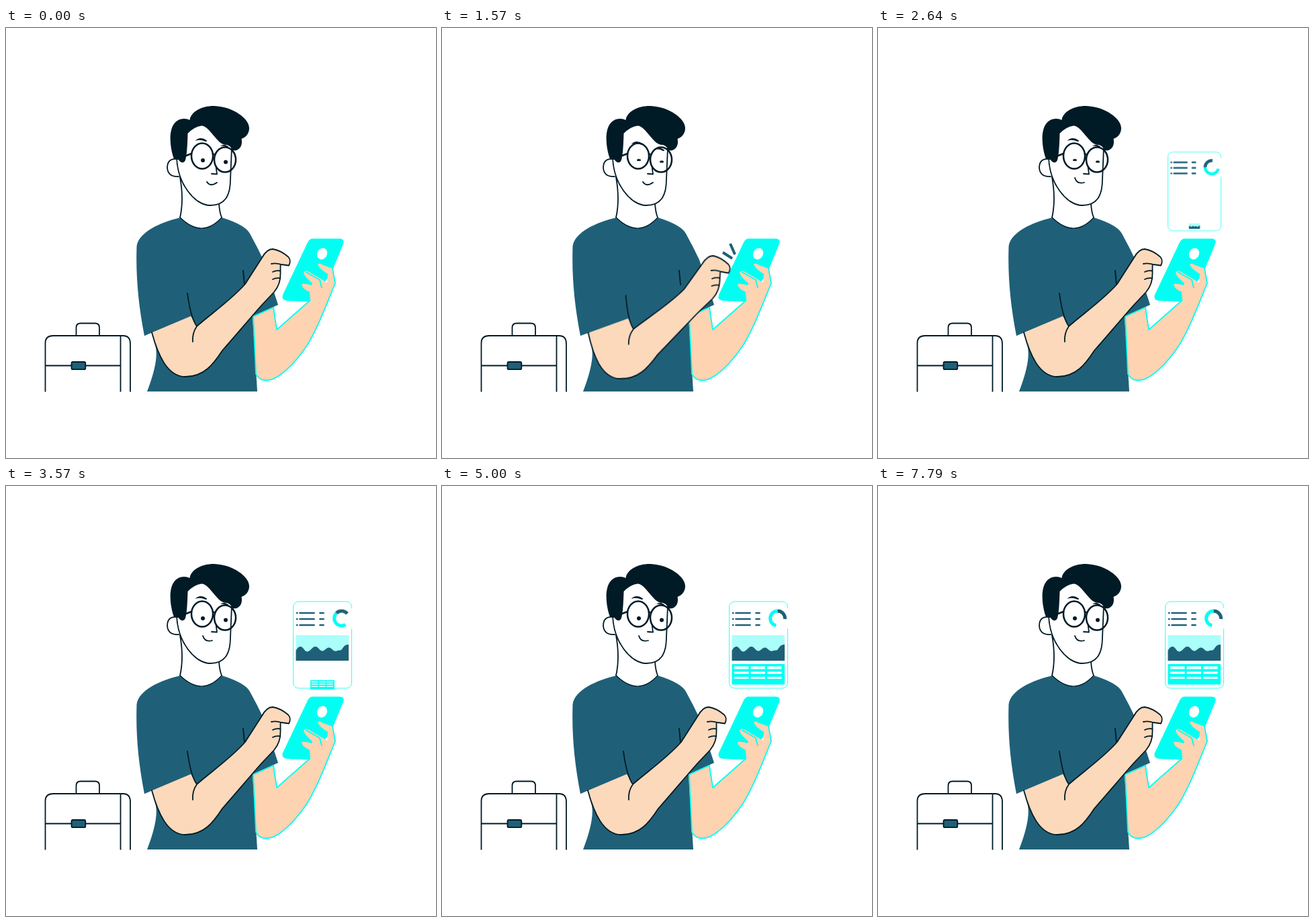
Animation, 640 px wide and 640 px high, one loop 9.57 s. Source, as an HTML page:

```html
<!DOCTYPE html>
<html lang="en">
<head>
<meta charset="utf-8">
<title>Man with phone</title>
<style>
  html, body { margin: 0; width: 100%; height: 100%; overflow: hidden; background: #fff; }
  svg { display: block; width: 100vw; height: 100vh; }

  .ink { fill: none; stroke: #001a26; stroke-width: 1.8; stroke-linecap: round; stroke-linejoin: round; }
  .dark { fill: #001a26; }
  .teal { fill: #1f6078; }
  .cyan { fill: #00fff2; }
  .edge { fill: none; stroke: #00fff2; stroke-width: 1.8; stroke-linejoin: round; }
  .bars { fill: none; stroke: #1f6078; stroke-width: 2.7; stroke-linecap: round; }
  .ring { fill: none; stroke-width: 5; }

  .arm, .brows, .pupil, .mouth, .spark, .pop, .donut {
    animation: 9.57s linear infinite;
  }
  .arm { animation-name: tap; transform-origin: 208px 465px; animation-timing-function: ease-in-out; }
  .brows { animation-name: frown; animation-timing-function: ease-in-out; }
  .pupil { animation-name: squint; transform-box: fill-box; transform-origin: center; }
  .mouth { animation-name: smile; animation-timing-function: ease-in-out; }
  .spark { animation-name: spark; stroke: #1f6078; stroke-width: 4; stroke-dasharray: 20; }
  .pop { transform-origin: 471px 309px; }
  .panel { animation-name: panel; }
  .wave { animation-name: wave; }
  .table { animation-name: table; }
  .donut { animation-name: spin; transform-origin: 499.5px 197px; }

  @keyframes tap {
    0%, 10.45%, 20.9%, 100% { transform: none; }
    16.2%, 17.1% { transform: rotate(3deg); }
  }
  @keyframes frown {
    0%, 10.45%, 20.9%, 100% { transform: none; }
    16.2%, 17.1% { transform: translateY(5px); }
  }
  @keyframes squint {
    0%, 10.45%, 33.44%, 63.43%, 81.4%, 100% { transform: none; }
    16.2%, 27.7%, 69.38%, 76.18% { transform: translateY(-.5px) scaleY(.55); }
  }
  @keyframes smile {
    0%, 20.9% { d: path("M299 229Q304 237 314 230"); }
    26.1%, 100% { d: path("M293 223Q296 233 307 230"); }
  }
  @keyframes spark {
    0%, 14.6% { stroke-dashoffset: 20; visibility: hidden; }
    14.7% { stroke-dashoffset: 20; visibility: visible; }
    16.2%, 17.1% { stroke-dashoffset: 0; visibility: visible; }
    18.7% { stroke-dashoffset: -20; visibility: visible; }
    18.8%, 100% { stroke-dashoffset: -20; visibility: hidden; }
  }
  @keyframes panel { 0%, 21.63% { transform: scale(0); } 28.2%, 100% { transform: none; } }
  @keyframes wave { 0%, 26.23% { transform: scale(0); } 32.8%, 100% { transform: none; } }
  @keyframes table { 0%, 34.3% { transform: scale(0); } 40.9%, 100% { transform: none; } }
  @keyframes spin { 0%, 21.63% { transform: rotate(-118deg); } 47%, 100% { transform: none; } }
</style>
</head>
<body>
<svg viewBox="0 0 640 640">
  <!-- briefcase -->
  <g class="ink">
    <path stroke-linecap="butt" d="M58.5 541.5V469Q58.5 458 70 458H174Q185 458 185 470V541.5M170.5 458V541.5M58.5 502.5H170.5"/>
    <path d="M104.5 458V446Q104.5 439.5 111 439.5H132.500Q139 439.5 139 446V458"/>
    <rect class="teal" x="97.500" y="497" width="20.800" height="11.200" rx="2" style="fill:#1f6078"/>
  </g>

  <!-- head -->
  <path class="ink" d="M254 192C255 232 281 264 304 264C329 264 334 245 334 225L336 178"/>
  <path class="ink" d="M254 195Q240 194 240 208Q241 222 257 221"/>
  <path class="ink" d="M259 222Q265 256 259 282M317 262Q318 275 321 282"/>
  <g class="brows dark">
    <path d="M281.500 168Q289 160.500 299 167.500Q299 170 296 168.500Q289 165.500 281.500 168Z"/>
    <path d="M319 176Q324 171.500 331 176.500Q331 179 328 177.500Q323 174.500 319 176Z"/>
  </g>
  <path class="dark" d="M250 195C242 172 240 136 265 135Q270 135 273.500 137C275 124 293 115.500 310 116C338 117 362 135 362 149C362 158 356 163 350.500 165C353 176 346 184 337 182Q335 176 329 174Q322 174 317 169C306 157 298 145 291 145.500Q280 147 270.500 157C270 175 269 195 266 198.500Q262 203 256.500 196Z"/>
  <g class="ink" style="stroke-width:2.500">
    <ellipse cx="292" cy="190.500" rx="16" ry="19"/>
    <ellipse cx="326" cy="196" rx="16" ry="18.500"/>
    <path d="M268 190L276 187M308 187.500L311 188.500"/>
  </g>
  <path class="ink" d="M312.500 206L314 217.500L306 217"/>
  <circle class="pupil dark" cx="293" cy="197" r="3"/>
  <circle class="pupil dark" cx="327" cy="199.500" r="3"/>
  <path class="mouth ink" d="M299 229Q304 237 314 230"/>

  <!-- shirt -->
  <path class="teal" d="M260 282Q292 314 321 282Q356 293 363 306Q374 326 383 345L405 412L367 429L374 541H210Q227 497 223 476L217 453L206 458C197 412 193 370 194.500 325C197 304 230 289 260 282Z"/>
  <path class="ink" style="stroke-width:1.200" d="M259 282Q292 314 321 282"/>
  <path class="ink" d="M353 361L355 382"/>

  <!-- phone and the hand holding it -->
  <path class="cyan" d="M456 313.500H497Q504.500 314 502 321.500L484 365L453 407.500L418 406Q409.500 405 412 397L449 319Q452 313.500 456 313.500Z"/>
  <ellipse cx="470.500" cy="336" rx="7.300" ry="8.800" fill="#fff" transform="rotate(28 470.500 336)"/>
  <path fill="#fed3b1" d="M368 430L398 416L403 449L453 405L452 393Q441 388 440 382Q441 379 455 383L456 380Q446 372 443 365Q445 359 451 363L478 379L479 366Q467 359 464 352Q466 349 472 353L486 358L490 380C476 414 465 444 449 471C432 497 406 525 387 524.500Q376 524 372 515Z"/>
  <path class="edge" d="M446 363L467 375L470 387M453 405L403 449L398 416M367 430L399 415.500M486 358L490 380C476 414 465 444 449 471C432 497 406 525 387 524.500Q376 524 372 515L368 430"/>

  <!-- tapping arm -->
  <g class="arm">
    <path fill="#fdd9bb" d="M217 453C226 486 240 519 267 519C295 519 309 500 322 480C345 454 364 431 381 412L399 393Q409 381 408.500 365V352L421 353.500Q425 346 420 340.500Q409 331 397 329Q388 329 381 342L356 381C335 405 303 427 284 444L270 420Z"/>
    <path class="teal" d="M202 380L206 458L277 428L270 395Z"/>
    <path class="ink" d="M217 453C226 486 240 519 267 519C295 519 309 500 322 480C345 454 364 431 381 412L399 393Q409 381 408.500 365V353M395 351Q402 349.500 410 352L421 353.500Q425 346 420 340.500Q409 331 397 329Q388 329 381 342L356 381C335 405 303 427 284 444Q277 454 278 467M270 395Q275 432 284 444M397 363Q402 360.500 408 361.500M397 374Q402 371.500 408 372.500"/>
  </g>
  <path class="spark" fill="none" d="M432 343L418 334M436 337L429 321"/>

  <!-- report -->
  <g class="pop panel">
    <rect x="427.500" y="172" width="87" height="129" rx="8" fill="#fff" stroke="#00fff2" stroke-width=".8"/>
    <g class="bars" id="rows"></g>
    <circle cx="499.500" cy="197" r="21.500" fill="#fff"/>
    <g class="donut">
      <path class="ring" stroke="#00fff2" d="M497 207.700A11 11 0 0 1 499.500 186"/>
      <path class="ring" stroke="#1f6078" d="M499.500 186A11 11 0 0 1 510.450 198"/>
    </g>
  </g>
  <g class="pop wave">
    <path fill="#aafffa" d="M431.500 222H510V260H431.500Z"/>
    <path class="teal" d="M431.500 245C434 240 437 238 440 239.500S445 247 449 246.500S456 239 460.500 239S467 246 471 245.500S477 240 481 240.500S487 247 492 245.500S497 245 499 244S502 236 510 236V260H431.500Z"/>
  </g>
  <g class="pop table">
    <rect class="cyan" x="431.500" y="265" width="78.500" height="30.500" rx="1"/>
    <g id="cells" fill="#fff"></g>
  </g>
</svg>
<script>
  const add = (id, tag, attrs) => {
    const el = document.createElementNS("http://www.w3.org/2000/svg", tag);
    for (const k in attrs) el.setAttribute(k, attrs[k]);
    document.getElementById(id).append(el);
  };
  for (const y of [189, 198, 207]) {
    add("rows", "path", { d: `M433 ${y}h.3M437.500 ${y}H458.500M467.500 ${y}H472.500` });
  }
  for (const [y, height] of [[268.500, 4], [276.500, 3], [284, 3]]) {
    for (const x of [435, 459.500, 484]) add("cells", "rect", { x, y, width: 21.500, height });
  }
</script>
</body>
</html>
```
